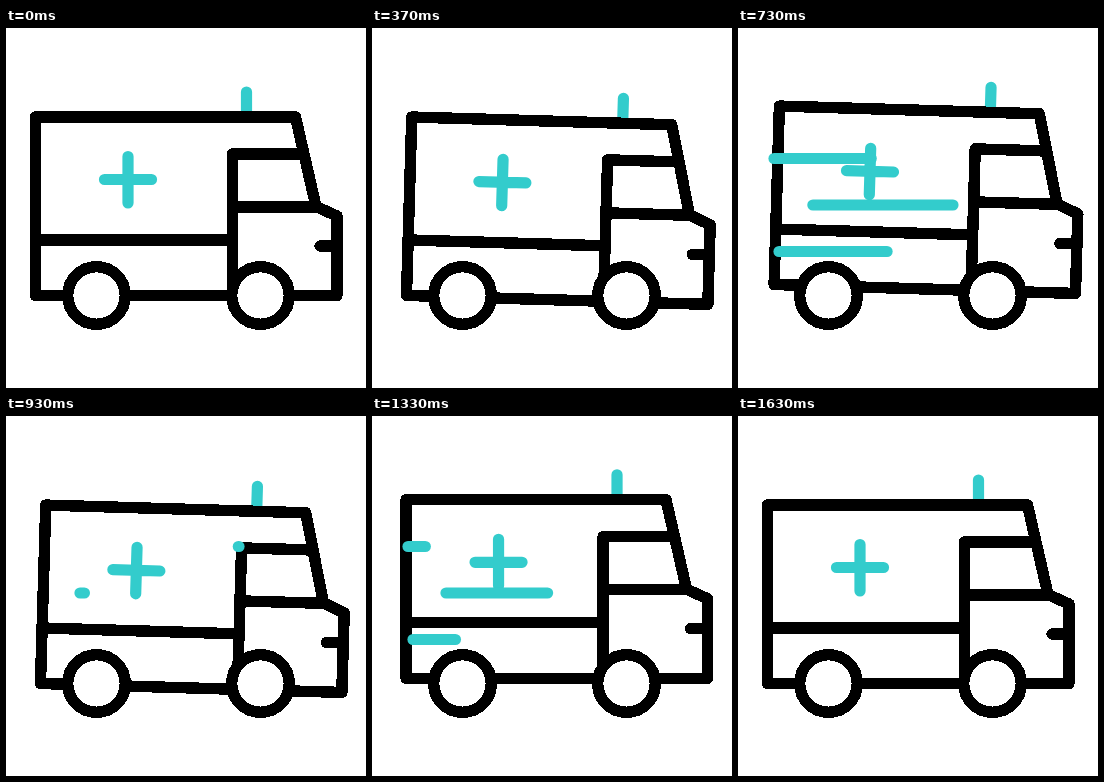
An HTML page for the animation above (1.67 s loop, 360 px wide and 360 px high).

```html
<!DOCTYPE html>
<html lang="en">
<head>
<meta charset="utf-8">
<title>Ambulance</title>
<style>
  html, body { margin: 0; width: 100%; height: 100%; overflow: hidden; background: #fff; }
  svg { display: block; width: 100vw; height: 100vh; }
  path, circle {
    fill: none; stroke: #000; stroke-width: 11.4;
    stroke-linecap: round; stroke-linejoin: round; shape-rendering: crispEdges;
  }
  .teal { stroke: #33cccc; stroke-width: 11.2; shape-rendering: auto; }
  circle { fill: #fff; }
</style>
</head>
<body>
<svg viewBox="0 0 360 360">
  <g id="van">
    <path class="teal" d="M240.5 64V84"/>
    <path class="teal" d="M122 128.5V175M98.5 151.5H145.5"/>
    <path d="M29.5 267.5V89H289.5L310 178.5L331 188V267.5Z"/>
    <path d="M29.5 212H226M297 126H226.5V260M226.5 179H310M314 218H331"/>
  </g>
  <circle cx="90.5" cy="267.5" r="28.8"/>
  <circle cx="254.5" cy="267.5" r="28.8"/>
  <g id="wind"></g>
</svg>
<script>
const LOOP = 1670;
const GUST = 527;   // time between the two gusts
const SWEEP = 240;  // time a streak end takes to cross
const LAG = 215;    // tail starts this long after the head

const rest = { x: 0, y: 0, turn: 0 };
const low = { x: 7.5, y: 4.5, turn: 1.7 };
const high = { x: 9.2, y: -7, turn: 1.7 };
const brake = { x: 0, y: -3.5, turn: -1.7 };

// Pull away, bounce, brake, settle
const ride = [
  { at: 0, pose: rest },
  { at: 355, pose: low },
  { at: 700, pose: high },
  { at: 933, pose: low },
  { at: 1160, pose: high },
  { at: 1500, pose: brake },
  { at: 1630, pose: rest },
  { at: LOOP, pose: rest }
];

const streaks = [
  { right: 233, left: 36, start: 395 },
  { right: 216, left: 74, start: 503 },
  { right: 184, left: 41, start: 437 }
];

const van = document.getElementById('van');
const wind = document.getElementById('wind');

streaks.forEach((s, i) => {
  s.y = 130.5 + 46.5 * i;
  s.line = document.createElementNS('http://www.w3.org/2000/svg', 'path');
  s.line.setAttribute('class', 'teal');
  wind.append(s.line);
});

const mix = (a, b, p) => a + (b - a) * p;
const ease = p => (1 - Math.cos(Math.PI * Math.min(1, Math.max(0, p)))) / 2;

function drawVan(t) {
  const i = ride.findIndex(k => k.at > t);
  const a = ride[i - 1], b = ride[i];
  const p = ease((t - a.at) / (b.at - a.at));
  const get = key => mix(a.pose[key], b.pose[key], p);
  van.setAttribute('transform',
    `translate(${get('x')} ${get('y')}) rotate(${get('turn')} 180 180)`);
}

function drawStreak({ right, left, start, y, line }, t) {
  const age = t - start - (t >= start + GUST ? GUST : 0);
  const end = time => mix(right, left, ease(time / SWEEP));
  const shown = age > 0 && age < SWEEP + LAG;
  line.setAttribute('d', shown ? `M${end(age - LAG)} ${y}H${end(age)}` : '');
}

function draw() {
  const t = performance.now() % LOOP;
  drawVan(t);
  streaks.forEach(s => drawStreak(s, t));
  requestAnimationFrame(draw);
}
draw();
</script>
</body>
</html>
```
